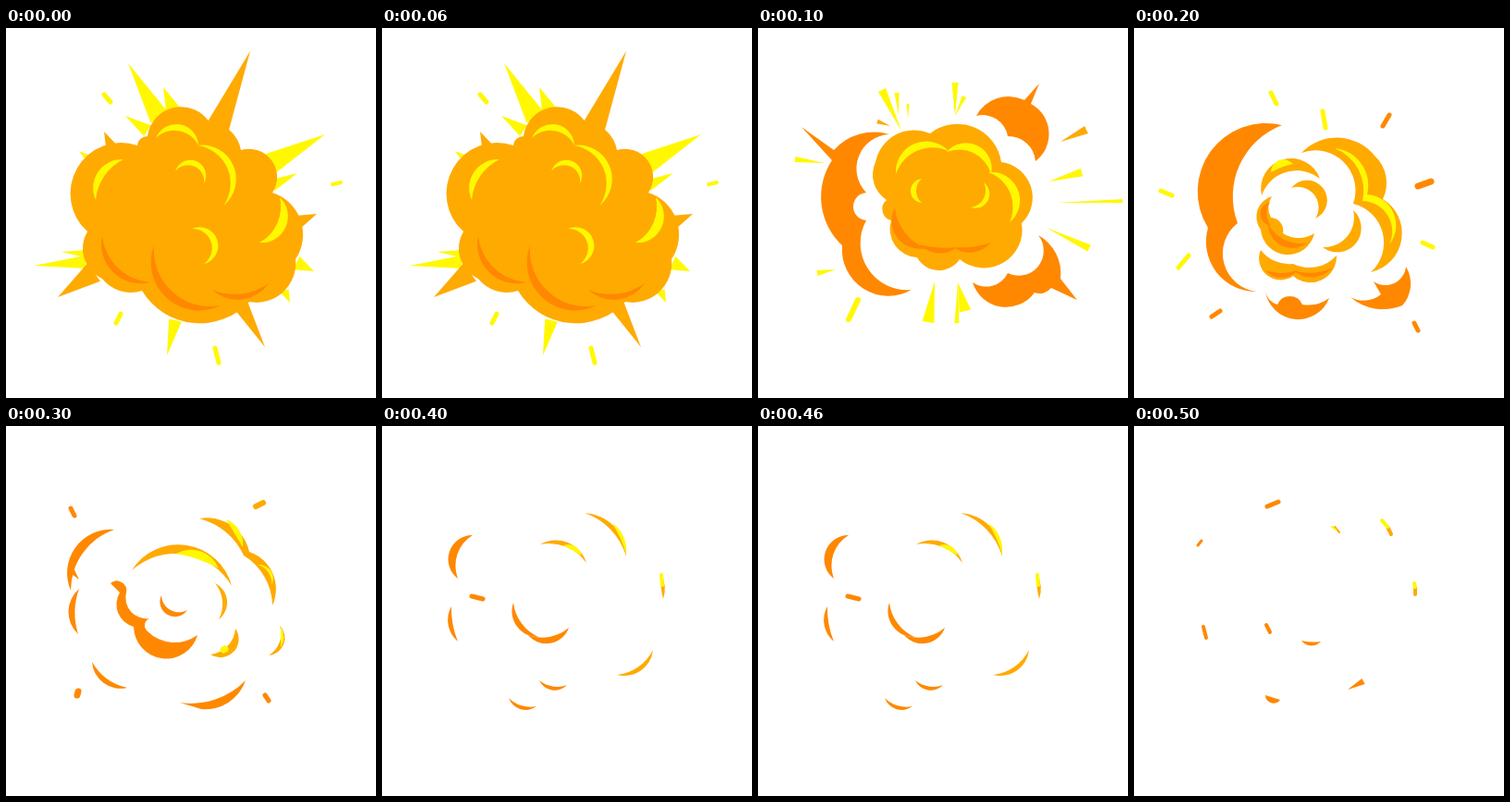
These frames come from a looping animation (400x400 px, 600 ms). An HTML page with a canvas:

```html
<!DOCTYPE html>
<html lang="en">
<head>
<meta charset="utf-8">
<title>Cartoon explosion</title>
<style>
  html, body { margin: 0; width: 100%; height: 100%; overflow: hidden; background: #fff; }
  canvas { display: block; }
</style>
</head>
<body>
<canvas width="400" height="400"></canvas>
<script>
const ctx = document.querySelector("canvas").getContext("2d");
const Y = "#fff800", O = "#ffaa00", D = "#ff8800";

// Closed outline of arcs: x, y, then the bulge towards the next corner.
// Positive bulges point outwards on a clockwise outline.
function blob(color, ...v) {
  let d = `M${v[0]} ${v[1]}`;
  for (let i = 0; i < v.length; i += 3) {
    const [x, y, h] = v.slice(i, i + 3), j = (i + 3) % v.length;
    const c = Math.hypot(v[j] - x, v[j + 1] - y) / 2;
    const r = h ? (c * c + h * h) / (2 * Math.abs(h)) : 0;
    d += `A${r} ${r} 0 ${+(Math.abs(h) > c)} ${+(h > 0)} ${v[j]} ${v[j + 1]}`;
  }
  ctx.fillStyle = color;
  ctx.fill(new Path2D(d + "Z"));
}

// Crescent from one tip to the other with an outer and an inner bulge.
function moon(color, x1, y1, x2, y2, outer, inner) {
  blob(color, x1, y1, outer, x2, y2, -inner);
}

// Triangle from its tip to the middle of its base.
function ray(color, x, y, bx, by, width) {
  const k = width / 2 / Math.hypot(bx - x, by - y);
  const nx = (y - by) * k, ny = (bx - x) * k;
  blob(color, x, y, 0, bx + nx, by + ny, 0, bx - nx, by - ny, 0);
}

function fleck(color, x1, y1, x2, y2, width = 5) {
  ctx.strokeStyle = color;
  ctx.lineWidth = width;
  ctx.lineCap = "round";
  ctx.beginPath();
  ctx.moveTo(x1, y1);
  ctx.lineTo(x2, y2);
  ctx.stroke();
}

function burst() {
  ray(Y, 132, 38, 166, 97, 22);
  ray(Y, 170, 64, 182, 92, 18);
  ray(Y, 129, 95, 153, 111, 14);
  ray(Y, 79, 133, 98, 148, 14);
  ray(Y, 345, 115, 285, 147, 24);
  ray(Y, 315, 157, 288, 170, 13);
  ray(Y, 30, 257, 86, 253, 14);
  ray(Y, 60, 242, 86, 244, 8);
  ray(Y, 174, 354, 183, 316, 14);
  ray(Y, 333, 263, 314, 254, 16);
  ray(Y, 307, 297, 301, 284, 10);
  ray(O, 264, 25, 229, 107, 25);
  ray(O, 106, 112, 115, 131, 14);
  ray(O, 336, 201, 315, 210, 15);
  ray(O, 56, 291, 95, 264, 24);
  ray(O, 280, 345, 253, 298, 17);
  fleck(Y, 106, 72, 113, 80);
  fleck(Y, 353, 169, 362, 167, 4);
  fleck(Y, 124, 309, 119, 319);
  fleck(Y, 226, 346, 230, 362);
  blob(O, 153, 117, 24, 220, 102, 8, 254, 132, 20, 288, 178, 19, 313, 250, 17,
    263, 296, 29, 147, 284, 7, 104, 271, 12, 88, 220, 44, 142, 127, 3);
  moon(Y, 162, 119, 208, 127, 19, 12);
  moon(Y, 207, 127, 235, 192, 27, 20);
  moon(Y, 183, 155, 214, 168, 19, 13);
  moon(Y, 97, 186, 127, 142, 15, 7);
  moon(Y, 296, 183, 274, 232, 19, 9);
  moon(Y, 201, 217, 214, 255, 22, 15);
  moon(D, 156, 275, 104, 225, 20, 13);
  moon(D, 232, 300, 160, 235, 33, 24);
  moon(D, 284, 276, 223, 283, 14, 8);
}

function split() {
  blob(D, 166, 283, 27, 91, 235, 17, 80, 143, 0, 47, 107, 0, 82, 132, 9,
    142, 115, -22, 117, 178, -14, 117, 208, -27);
  blob(D, 236, 95, 11, 288, 78, 0, 304, 60, 0, 295, 82, 17, 300, 144, -8, 270, 117, -9);
  blob(D, 303, 224, 8, 327, 271, 0, 345, 294, 0, 317, 281, 3, 299, 286, 21,
    232, 275, -9, 270, 265, -21);
  blob(O, 127, 145, 16, 186, 114, 24, 263, 145, 22, 285, 211, 27, 218, 250, 13,
    172, 248, 12, 144, 208, 7, 139, 186, 8);
  moon(Y, 149, 158, 206, 133, 22, 14);
  moon(Y, 204, 134, 252, 158, 21, 12);
  moon(Y, 249, 156, 272, 210, 22, 13);
  moon(Y, 177, 189, 177, 163, 12, 6);
  moon(Y, 244, 167, 230, 194, 13, 8);
  moon(D, 252, 232, 211, 237, 8, 2);
  moon(D, 215, 237, 175, 234, 8, 2);
  moon(D, 182, 238, 148, 194, 18, 8);
  ray(Y, 155, 111, 134, 67, 9);
  ray(Y, 152, 94, 150, 70, 5);
  ray(Y, 162, 98, 162, 82, 3);
  ray(Y, 213, 95, 213, 59, 7);
  ray(Y, 213, 95, 223, 74, 5);
  ray(Y, 314, 166, 350, 156, 9);
  ray(Y, 323, 189, 394, 187, 4);
  ray(Y, 312, 216, 358, 238, 8);
  ray(Y, 72, 146, 40, 142, 6);
  ray(Y, 84, 261, 64, 265, 6);
  fleck(Y, 108, 294, 98, 315, 6);
  ray(Y, 191, 274, 184, 318, 13);
  ray(Y, 216, 275, 215, 319, 5);
  ray(Y, 216, 275, 224, 306, 13);
  ray(O, 327, 123, 355, 110, 9);
  ray(O, 143, 106, 129, 101, 5);
}

function hollow() {
  blob(D, 133, 285, 22, 80, 216, 46, 160, 105, -24, 112, 211, -26);
  blob(D, 211, 292, 27, 142, 284, -3, 155, 299, 9, 182, 299, -3);
  blob(D, 294, 258, 7, 290, 300, 8, 234, 291, -5, 267, 288, 0, 259, 274, -11);
  blob(O, 181, 135, 18, 260, 138, 8, 269, 185, 27, 256, 264, -23, 237, 190, -25);
  blob(Y, 217, 130, 14, 252, 180, 18, 276, 234, -15, 247, 187, -12);
  moon(O, 138, 181, 201, 163, 31, 17);
  moon(Y, 148, 156, 172, 147, 9, 1);
  moon(O, 170, 173, 196, 206, 27, 15);
  blob(O, 195, 222, 25, 137, 218, 10, 149, 182, -3, 148, 205, 5, 161, 222, -5);
  moon(O, 237, 197, 204, 237, 25, 13);
  blob(O, 219, 246, 17, 172, 268, 17, 137, 240, -5, 172, 255, -8);
  moon(D, 188, 232, 145, 212, 15, 8);
  moon(D, 148, 214, 147, 188, 11, 4);
  moon(D, 215, 259, 172, 262, 9, 4);
  moon(D, 177, 262, 142, 262, 8, 3);
  fleck(Y, 148, 70, 154, 82);
  fleck(Y, 204, 90, 207, 108);
  fleck(Y, 312, 232, 323, 237);
  fleck(Y, 29, 176, 41, 181);
  fleck(Y, 59, 246, 48, 259);
  fleck(D, 276, 94, 269, 106);
  fleck(D, 321, 166, 307, 171, 7);
  fleck(D, 93, 306, 84, 312);
  fleck(D, 303, 319, 307, 327);
}

function wisps() {
  moon(D, 70, 178, 117, 112, 23, 13);
  ray(D, 79, 166, 70, 155, 7);
  moon(D, 78, 225, 79, 176, 11, 4);
  blob(D, 207, 226, 30, 138, 217, 10, 123, 180, 0, 113, 170, 7, 130, 180, -10,
    155, 208, -4, 153, 222, -10);
  moon(D, 196, 199, 168, 183, 15, 9);
  moon(D, 131, 283, 93, 255, 11, 5);
  blob(D, 259, 275, 10, 211, 306, 0, 188, 299, -9);
  fleck(D, 70, 89, 74, 97);
  fleck(D, 78, 287, 77, 291, 7);
  fleck(D, 280, 291, 284, 297);
  moon(O, 136, 156, 244, 173, 36, 26);
  blob(O, 209, 100, 13, 263, 136, 14, 288, 194, -8, 257, 140, -7);
  moon(O, 226, 170, 230, 209, 11, 6);
  moon(O, 248, 219, 221, 247, 16, 7);
  moon(O, 296, 216, 284, 248, 11, 6);
  fleck(O, 270, 87, 278, 83, 6);
  moon(Y, 184, 138, 230, 154, 11, 2);
  moon(Y, 238, 101, 256, 131, 6, 0);
  moon(Y, 272, 150, 287, 172, 8, 5);
  fleck(Y, 235, 242, 237, 241, 7);
  moon(Y, 297, 217, 297, 240, 3, 0);
}

function arcs() {
  moon(D, 82, 165, 98, 118, 18, 9);
  moon(D, 82, 233, 75, 195, 7, 2);
  fleck(D, 97, 184, 109, 187);
  moon(D, 202, 218, 158, 226, 13, 6);
  moon(D, 169, 228, 142, 191, 12, 6);
  moon(D, 200, 280, 170, 275, 8, 4);
  moon(D, 167, 303, 137, 294, 8, 4);
  moon(O, 171, 128, 221, 148, 13, 8);
  moon(O, 219, 94, 264, 141, 13, 8);
  moon(O, 301, 159, 304, 187, 3, -1);
  moon(O, 293, 242, 254, 269, 11, 6);
  moon(Y, 196, 129, 216, 140, 5, 0);
  moon(Y, 249, 105, 264, 138, 5, 1);
  fleck(Y, 302, 161, 303, 172, 4);
}

function specks() {
  fleck(D, 144, 87, 156, 82);
  fleck(D, 69, 129, 73, 124, 3);
  fleck(D, 75, 217, 78, 229, 4);
  fleck(D, 143, 215, 147, 223, 4);
  moon(D, 202, 233, 181, 232, 5, 1);
  moon(D, 158, 296, 142, 291, 6, 0);
  ray(D, 231, 285, 248, 276, 7);
  fleck(O, 217, 109, 222, 115, 2);
  fleck(O, 274, 109, 278, 117, 4);
  fleck(O, 304, 175, 304, 182, 4);
  fleck(Y, 214, 109, 218, 112, 2);
  fleck(Y, 268, 102, 274, 109, 4);
  fleck(Y, 303, 170, 304, 174, 4);
}

const STEP = 100;
const poses = [burst, split, hollow, wisps, arcs, specks];
const start = performance.now();

function tick() {
  const step = Math.floor((performance.now() - start) / STEP);
  ctx.fillStyle = "#fff";
  ctx.fillRect(0, 0, 400, 400);
  poses[step % poses.length]();
  requestAnimationFrame(tick);
}
tick();
</script>
</body>
</html>
```
